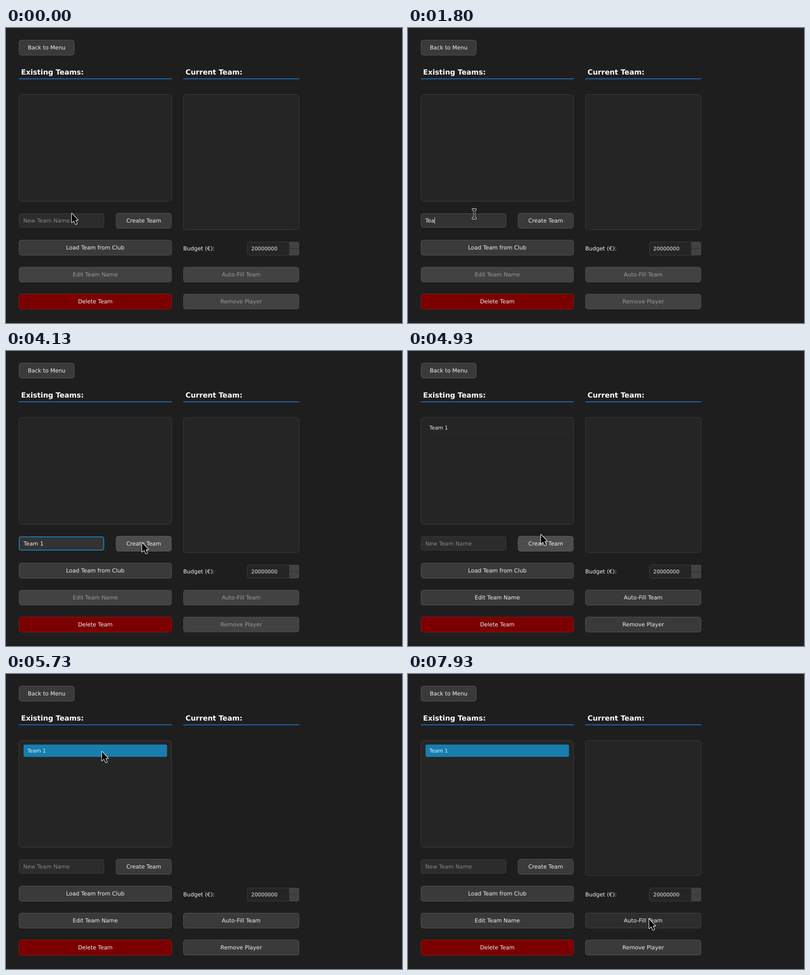
Recreate the animation shown at these times as an HTML page with a canvas. Size 867 by 646 pixels, loop 8 s.

```html
<!DOCTYPE html>
<html lang="en">
<head>
<meta charset="utf-8">
<title>Team editor</title>
<style>
  html, body { margin: 0; width: 100%; height: 100%; overflow: hidden; background: #1e1e1e; }
  canvas { display: block; width: 867px; height: 646px; }
</style>
</head>
<body>
<canvas id="stage" width="867" height="646"></canvas>
<script>
const ctx = document.getElementById('stage').getContext('2d');
const LOOP = 8000;
const BODY = 12.14, SMALL = 11.27, HEAD = 15.6;

// Pointer path: time, x, y
const path = [
  [0, 144, 406], [70, 145, 407], [3130, 145, 407], [3330, 150, 408], [3600, 152, 410],
  [4000, 298, 420], [4700, 298, 420], [4930, 291, 402], [5400, 212, 173], [5600, 210, 170],
  [6070, 210, 170], [6330, 212, 177], [6470, 214, 180], [6930, 504, 398],
  [7270, 527, 521], [7530, 528, 537], [LOOP, 528, 537]
];
const keyTimes = [1270, 1470, 1700, 1930, 2130, 2530];
const CLICK_FIELD = 530, PRESS_CREATE = 4270, CREATED = 4370;
const SELECTED = 5670, LIST_BACK = 5790, PRESS_FILL = 7800;

const arrow = new Path2D('M0 0V20L4.6 15.8L8.1 23.4Q9.8 24 11.3 22.2L8 14.6H13.6Z');
const beam = new Path2D('M-4-11H-1L0-10L1-11H4V-8.5H1.2V8.5H4V11H1L0 10L-1 11H-4V8.5H-1.2V-8.5H-4Z');

const within = (t, from, to) => t >= from && t < to;

function pointerAt(t) {
  const i = path.findIndex(p => p[0] > t);
  const [t0, x0, y0] = path[i - 1], [t1, x1, y1] = path[i];
  const k = (t - t0) / (t1 - t0);
  return { x: x0 + (x1 - x0) * k, y: y0 + (y1 - y0) * k };
}

function box(x, y, w, h, r, fill, stroke, line = 1) {
  ctx.beginPath();
  ctx.roundRect(x + line / 2, y + line / 2, w - line, h - line, r);
  ctx.fillStyle = fill;
  ctx.fill();
  if (!stroke) return;
  ctx.strokeStyle = stroke;
  ctx.lineWidth = line;
  ctx.stroke();
}

function rect(x, y, w, h, fill) {
  ctx.fillStyle = fill;
  ctx.fillRect(x, y, w, h);
}

function text(str, x, y, size = BODY, color = '#f0f0f0', align = 'left', weight = 'normal') {
  ctx.font = `${weight} ${size}px "DejaVu Sans", sans-serif`;
  ctx.textRendering = 'geometricPrecision';
  ctx.textAlign = align;
  ctx.fillStyle = color;
  ctx.fillText(str, x, y);
}

const buttonStyles = {
  normal: ['#3a3a3a', '#555555', '#f0f0f0'],
  hover: ['#4d4d4d', '#5c5c5c', '#f0f0f0'],
  pressed: ['#2d2d2d', '#444444', '#f0f0f0'],
  disabled: ['#424242', '#4a4a4a', '#999999'],
  danger: ['#7b0000', '#a31212', '#f0f0f0']
};

function button(label, x, y, w, state = 'normal') {
  const [fill, stroke, color] = buttonStyles[state];
  box(x, y, w, 34, 5, fill, stroke);
  text(label, x + w / 2, y + 20.7, BODY, color, 'center');
}

function heading(label, x, w) {
  text(label, x + 5, 102, HEAD, '#ffffff', 'left', 'bold');
  rect(x, 110.4, w, 1.8, '#2273c3');
}

const list = (x, w, h) => box(x, 145, w, h, 6, '#252525', '#3d3d3d');

function nameField(t, hover) {
  const focus = within(t, CLICK_FIELD, PRESS_CREATE);
  const ring = focus && !hover;
  if (ring) box(28, 406, 187, 31, 4, '#333333', '#1a7db0', 2);
  else box(28, 406, 187, 31, 4, hover ? '#333333' : '#2c2c2c', hover ? '#525252' : '#3d3d3d');

  const count = t < CREATED ? keyTimes.filter(k => t >= k).length : 0;
  const typed = 'Team 1'.slice(0, count);
  const x = ring ? 38.6 : 37.7;
  text(typed || 'New Team Name', x, 426, BODY, typed ? '#f0f0f0' : '#858585');

  const blinkOn = within(t, CLICK_FIELD, 1060) || within(t, keyTimes[0], 3100) || within(t, 3590, 4120);
  if (focus && blinkOn) {
    const width = typed ? ctx.measureText(typed).width : 0;
    rect(Math.round(x + width), 414.5, 1, 14, '#e0e0e0');
  }
}

function teamItem(t, hover) {
  if (t < CREATED) return;
  if (t >= SELECTED) box(38, 154, 315, 28, 3, '#177eae');
  else {
    if (hover) box(38, 154, 315, 28, 3, '#333333');
    rect(38, 181.5, 315, 1, '#303030');
  }
  text('Team 1', 47, 171.7, SMALL);
}

function budget() {
  text('Budget (€):', 388, 487);
  box(528, 468, 114, 30, 4, '#252525', '#3d3d3d');
  ctx.beginPath();
  ctx.roundRect(620, 468, 22, 30, [0, 4, 4, 0]);
  ctx.fillStyle = '#424242';
  ctx.fill();
  rect(620, 482.5, 22, 1, '#2c2c2c');
  text('20000000', 537, 487, SMALL);
}

function drawPointer(p, editing) {
  const shape = editing ? beam : arrow;
  ctx.save();
  ctx.translate(Math.round(p.x), Math.round(p.y));
  ctx.lineJoin = 'round';
  ctx.strokeStyle = '#ffffff';
  ctx.lineWidth = editing ? 1.8 : 2.2;
  ctx.stroke(shape);
  ctx.fillStyle = '#000000';
  ctx.fill(shape);
  ctx.restore();
}

function draw(t) {
  const p = pointerAt(t);
  const over = (x, y, w, h) => within(p.x, x, x + w) && within(p.y, y, y + h);
  const editing = t >= 70 && over(28, 406, 187, 31);
  const ready = t >= CREATED ? 'normal' : 'disabled';

  rect(0, 0, 867, 646, '#1e1e1e');
  button('Back to Menu', 28, 26, 122);
  heading('Existing Teams:', 28, 335);
  heading('Current Team:', 388, 254);
  list(28, 335, 235);
  if (!within(t, SELECTED, LIST_BACK)) list(388, 254, 297);
  teamItem(t, over(38, 154, 315, 28));

  nameField(t, editing);
  const createState = within(t, PRESS_CREATE, CREATED) ? 'pressed' : over(241, 401, 121, 38) ? 'hover' : 'normal';
  button('Create Team', 240.5, 405, 122, createState);
  button('Load Team from Club', 28, 464, 335);
  button('Edit Team Name', 28, 523, 335, ready);
  button('Delete Team', 28, 582, 335, 'danger');

  budget();
  const fillState = t >= PRESS_FILL ? 'pressed' : over(388, 523, 254, 34) ? 'hover' : ready;
  button('Auto-Fill Team', 388, 523, 254, fillState);
  button('Remove Player', 388, 582, 254, ready);
  drawPointer(p, editing);
}

const start = performance.now();
function frame() {
  draw((performance.now() - start) % LOOP);
  requestAnimationFrame(frame);
}
frame();
</script>
</body>
</html>
```
